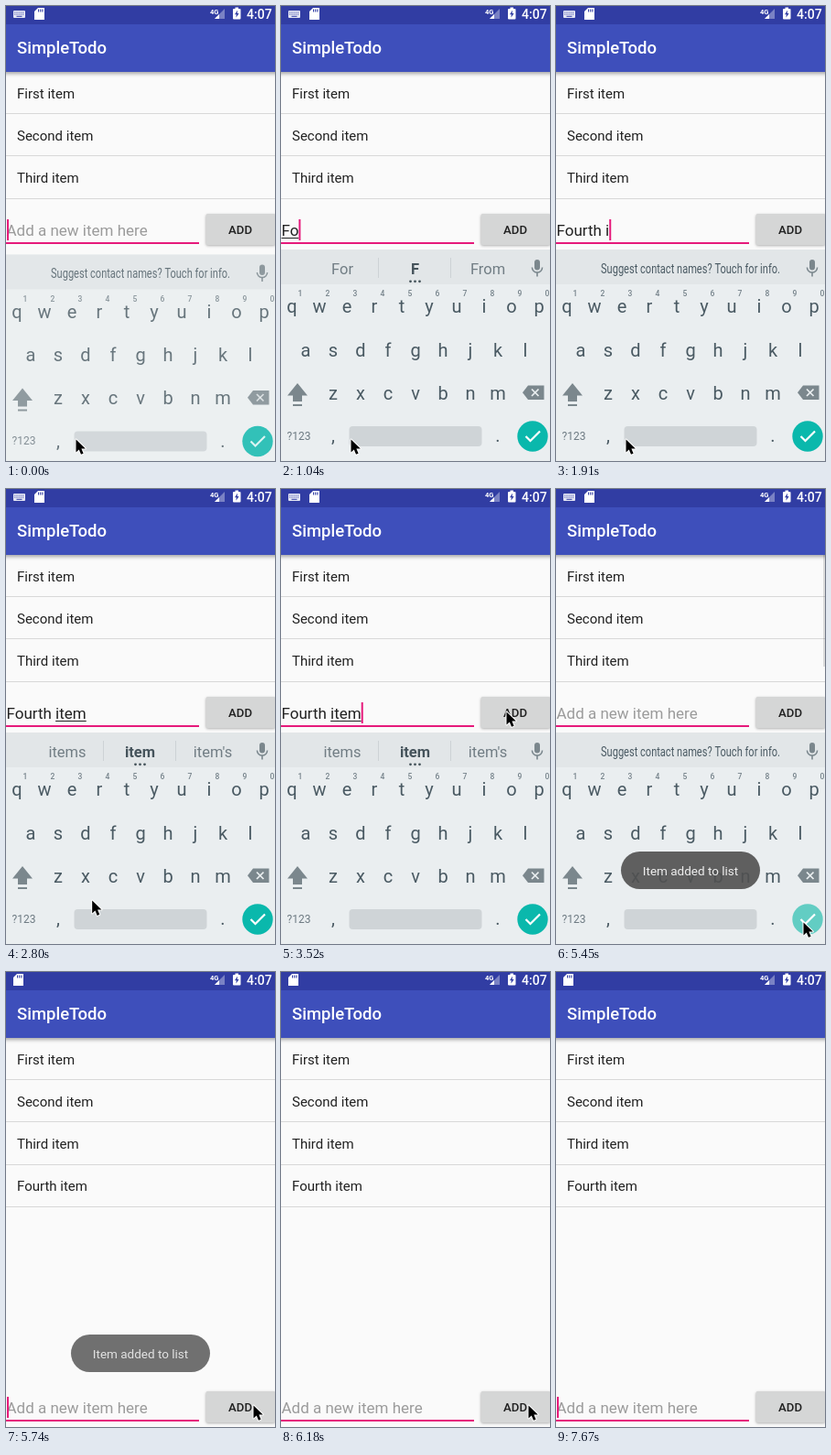
These frames come from a looping animation (294 px wide and 497 px high, 8 s). An HTML page with a canvas:

```html
<!DOCTYPE html>
<html lang="en">
<head>
<meta charset="utf-8">
<title>SimpleTodo</title>
<style>
html, body { margin: 0; width: 100%; height: 100%; overflow: hidden; background: #fafafa; }
canvas { display: block; width: 294px; height: 497px; }
</style>
</head>
<body>
<canvas id="stage" width="294" height="497"></canvas>
<script>
const ctx = document.getElementById('stage').getContext('2d');
const W = 294, H = 497, LOOP = 8000, STEP = 147.2;

const INK = '#212121', PINK = '#e6197b', KEY = '#4a5a63', ICON = '#7b878d';
const TYPED = 'Fourth item';
const ITEMS = ['First item', 'Second item', 'Third item', 'Fourth item'];
const BLINKS = [3, 6, 19, 22, 28, 31, 35, 38, 42, 45, 49, 52];
const HINTS = {
  7: ['For', 'F', 'From'], 8: ['For', 'Fo', 'Four'], 9: ['Four', 'Fou', 'Found'],
  10: ['Fours', 'Four', 'Fourth'], 11: ['Forth', 'Fourth', 'Fourt'], 12: ['Forth', 'Fourth', 'Fourths'],
  14: ["it's", 'it', 'its'], 15: ['item', 'ite', 'items'], 16: ['items', 'item', "item's"]
};

const clamp = v => Math.max(0, Math.min(1, v));
const ease = v => { v = clamp(v); return v * v * (3 - 2 * v); };

function rect(x, y, w, h, color) {
  ctx.fillStyle = color;
  ctx.fillRect(x, y, w, h);
}

function round(x, y, w, h, r, color) {
  ctx.fillStyle = color;
  ctx.beginPath();
  ctx.roundRect(x, y, w, h, r);
  ctx.fill();
}

function disc(x, y, r, color) {
  ctx.fillStyle = color;
  ctx.beginPath();
  ctx.arc(x, y, r, 0, Math.PI * 2);
  ctx.fill();
}

function trace(points, closed) {
  ctx.beginPath();
  for (const [x, y] of points) ctx.lineTo(x, y);
  if (closed) ctx.closePath();
}

function poly(points, color) {
  trace(points, true);
  ctx.fillStyle = color;
  ctx.fill();
}

function line(points, color, width) {
  trace(points, false);
  ctx.strokeStyle = color;
  ctx.lineWidth = width;
  ctx.stroke();
}

function text(str, x, y, size, color, weight = 400, align = 'left') {
  ctx.font = `${weight} ${size}px Roboto, sans-serif`;
  ctx.textAlign = align;
  ctx.fillStyle = color;
  ctx.fillText(str, x, y);
}

function shadowed(blur, dy, alpha, draw) {
  ctx.save();
  ctx.shadowColor = `rgba(0,0,0,${alpha})`;
  ctx.shadowBlur = blur;
  ctx.shadowOffsetY = dy;
  draw();
  ctx.restore();
}

function statusBar(keyboardOpen) {
  const white = '#fff', bg = '#313da3';
  rect(0, 0, W, 20, bg);
  let x = 8;
  if (keyboardOpen) {
    round(8, 5, 13, 8, 1, '#e4e6f4');
    for (let i = 0; i < 5; i++) {
      rect(9.3 + i * 2.2, 6.5, 1, 1, bg);
      rect(9.3 + i * 2.2, 8.6, 1, 1, bg);
    }
    rect(11.5, 10.8, 6, 1, bg);
    x = 31;
  }
  poly([[x + 4, 2], [x + 11, 2], [x + 11, 15], [x, 15], [x, 6]], white);
  for (let i = 0; i < 3; i++) rect(x + 4 + i * 2.2, 3.5, 1.1, 3, bg);

  poly([[239, 3], [239, 14], [228, 14]], '#7a82c4');
  poly([[233, 9], [233, 14], [228, 14]], white);
  text('4G', 223, 8.5, 7.5, white, 700);
  rect(250.5, 1.5, 3.5, 2, white);
  round(248, 3, 8.5, 11.5, 1, white);
  poly([[253, 4.5], [250, 9.2], [251.8, 9.2], [251.4, 12.8], [254.6, 8], [252.7, 8]], bg);
  text('4:07', 263, 13.5, 14, white, 500);
}

function appBar() {
  shadowed(4, 1.5, 0.35, () => rect(-8, 20, W + 16, 52, '#3e4fbb'));
  text('SimpleTodo', 12, 52, 18.5, '#fff', 500);
}

function list(count, scrollAlpha) {
  for (let i = 0; i < count; i++) {
    text(ITEMS[i], 12, 100.5 + i * 46.2, 15, INK);
    rect(0, 117 + Math.round(i * 46.3), W, 1, '#d8d8d8');
  }
  if (scrollAlpha) rect(292, 72, 2, 122, `rgba(0,0,0,${scrollAlpha})`);
}

function inputRow(y, value, caretOn, pressed) {
  ctx.save();
  ctx.translate(0, y);
  let end = 1;
  if (value) {
    text(value, 0.5, 25, 17, INK);
    end = 0.5 + ctx.measureText(value).width;
    const start = value.lastIndexOf(' ') + 1;
    if (value.length - start > 1) {
      const from = 0.5 + ctx.measureText(value.slice(0, start)).width;
      rect(from, 27, end - from, 1, INK);
    }
  } else {
    text('Add a new item here', 0.5, 25, 17, '#9b9b9b');
  }
  rect(0, 32, 211, 2, PINK);
  if (caretOn) rect(end, 7, 2, 23, PINK);

  shadowed(3, 1, 0.3, () => round(218.5, 1, 76, 34, 2, pressed ? '#cbcccc' : '#d5d6d6'));
  text('ADD', 256, 23, 13.2, INK, 500, 'center');
  ctx.restore();
}

function strip(hints) {
  if (hints) {
    hints.forEach((word, i) => {
      const mid = i === 1;
      text(word, 67 + i * 79.5, 292.5, 16.5, mid ? '#45535b' : '#717d84', mid ? 700 : 400, 'center');
    });
    rect(106, 275, 1, 22, '#cdd2d5');
    rect(185, 275, 1, 22, '#cdd2d5');
    for (const x of [141.5, 146.5, 151.5]) disc(x, 300.8, 1.4, '#45535b');
  } else {
    // condensed face
    ctx.save();
    ctx.translate(147, 291.5);
    ctx.scale(0.79, 1);
    text('Suggest contact names? Touch for info.', 0, 0, 14, KEY, 400, 'center');
    ctx.restore();
  }
  round(277, 277, 6, 11.5, 3, ICON);
  ctx.beginPath();
  ctx.arc(280, 285.5, 5.6, 0, Math.PI);
  ctx.strokeStyle = ICON;
  ctx.lineWidth = 1.5;
  ctx.stroke();
  rect(279.2, 291, 1.6, 4.5, ICON);
}

function keyRow(letters, x, y) {
  [...letters].forEach((c, i) => text(c, x + i * 30, y, 20, KEY, 400, 'center'));
}

function keyboard(dy, alpha, hints, enterDown) {
  ctx.save();
  ctx.globalAlpha = alpha;
  ctx.translate(0, dy);
  rect(0, 266, W, H - 266, '#eaeef0');
  rect(0, 266, W, 38, '#e2e6e8');
  strip(hints);

  [...'1234567890'].forEach((c, i) => text(c, 21 + i * 30, 317, 8.5, '#75828a', 500, 'center'));
  keyRow('qwertyuiop', 12, 335);
  keyRow('asdfghjkl', 27, 382.5);
  keyRow('zxcvbnm', 57, 429.5);

  poly([[18, 412], [29, 425.5], [23, 425.5], [23, 432], [13, 432], [13, 425.5], [7, 425.5]], ICON);
  rect(13, 435, 10, 2, ICON);

  poly([[270, 414.5], [287.5, 414.5], [287.5, 430], [270, 430], [264, 422.2]], ICON);
  line([[274, 418.5], [281.5, 426]], '#eaeef0', 1.7);
  line([[281.5, 418.5], [274, 426]], '#eaeef0', 1.7);

  text('?123', 19.5, 473.5, 12, '#6b7880', 400, 'center');
  text(',', 57, 476, 20, KEY, 400, 'center');
  text('.', 237, 476, 20, KEY, 400, 'center');
  round(74.5, 459, 145, 22, 4, '#cfd4d7');

  disc(275, 470, 16.7, enterDown ? '#62cdc3' : '#0ab8ac');
  line([[267.5, 470], [272.5, 475], [283, 464.5]], '#fff', 2.2);
  ctx.restore();
}

function toast(alpha) {
  ctx.save();
  ctx.globalAlpha = alpha;
  round(71, 396, 152, 41, 20.5, 'rgba(80,80,80,0.9)');
  text('Item added to list', 147, 422, 13.5, '#eee', 400, 'center');
  ctx.restore();
}

function pointer(x, y, alpha) {
  ctx.save();
  ctx.globalAlpha = alpha;
  ctx.translate(x, y);
  trace([[0.5, 0.5], [0.5, 14.5], [3.8, 11.5], [6, 16.8], [8.6, 15.7], [6.4, 10.5], [10.8, 10.5]], true);
  ctx.lineJoin = 'round';
  ctx.strokeStyle = '#fff';
  ctx.lineWidth = 2;
  ctx.stroke();
  ctx.fillStyle = '#000';
  ctx.fill();
  ctx.restore();
}

function pointerAt(k) {
  const a = ease((k - 18) / 5), b = ease((k - 30) / 6);
  return [76 + 170 * a + 24 * b, 473 - 230 * a + 230 * b];
}

function toastAlpha(k) {
  if (k < 26 || k > 41) return 0;
  if (k < 28) return k === 26 ? 0.4 : 0.8;
  return k < 39 ? 1 : 0.9 - (k - 39) * 0.35;
}

function draw(k) {
  const open = k < 38;
  const value = k < 26 ? TYPED.slice(0, Math.max(0, k - 5)) : '';
  const caretOn = BLINKS.filter(b => b <= k).length % 2 === 0;
  const scroll = k < 26 || !open ? 0 : 0.32 - 0.2 * clamp((k - 34) / 3);
  const hints = k < 26 ? HINTS[Math.min(k, 16)] : null;

  rect(0, 0, W, H, '#fafafa');
  list(open ? 3 : 4, scroll);
  appBar();
  statusBar(open);
  inputRow(open ? 226 : 457, value, caretOn, k >= 25 && k < 31);

  if (k === 0) keyboard(5.5, 0.82, null, false);
  else if (open) keyboard(0, 1, hints, k === 37);
  else if (k === 38) keyboard(25, 0.4, null, true);

  const shown = toastAlpha(k);
  if (shown) toast(shown);
  const seen = 1 - clamp((k - 46) / 3);
  if (seen) pointer(...pointerAt(k), seen);
}

const start = performance.now();
let last = -1;

function tick() {
  const t = (performance.now() - start) % LOOP;
  const k = Math.floor((t + 14) / STEP);
  if (k !== last) draw(last = k);
  requestAnimationFrame(tick);
}

tick();
</script>
</body>
</html>
```
